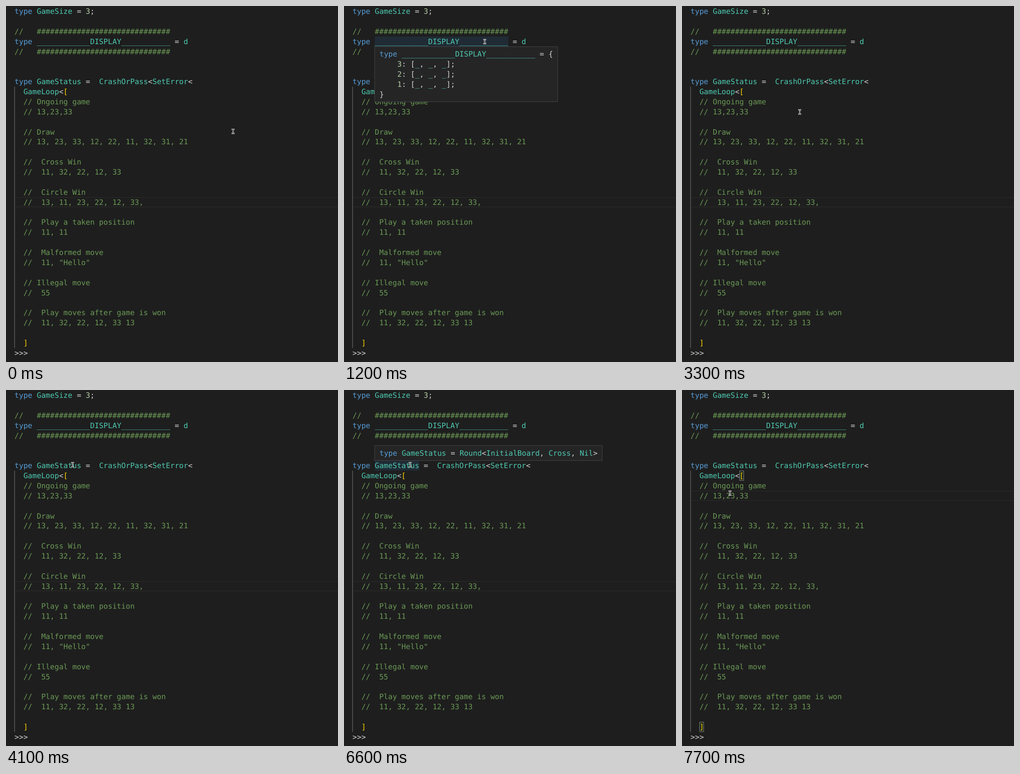
An HTML page that plays this animation: 723 by 775 pixels, repeating every 8 s.

```html
<!DOCTYPE html>
<html lang="en">
<head>
<meta charset="utf-8">
<title>Type-level game</title>
<style>
  html, body { margin: 0; width: 100%; height: 100%; overflow: hidden; background: #1e1e1e; }
  svg { display: block; width: 723px; height: 775px; }
  text {
    font: 16.1px "DejaVu Sans Mono", monospace;
    white-space: pre;
    text-rendering: geometricPrecision;
    fill: #d4d4d4;
  }
  .keyword { fill: #569cd6; }
  .name { fill: #4ec9b0; }
  .number { fill: #b5cea8; }
  .comment { fill: #6a9955; }
  .bracket { fill: #ffd700; }
  .tip .bracket { fill: #d4d4d4; }
  .panel { fill: #252526; stroke: #454545; }
  .hover { fill: #264f78; fill-opacity: .25; }
  .guide { stroke: #707070; stroke-width: 1.1; }
  .active { fill: none; stroke: #2b2b2b; stroke-width: 1.2; }
  .match { fill: #006400; fill-opacity: .1; stroke: #888; }
  .halo { fill: none; stroke: #f4f4f4; stroke-width: 2.5; }
  .core { fill: none; stroke: #111; stroke-width: .9; }
  .arrow { fill: #111; stroke: #f4f4f4; stroke-width: 1; stroke-linejoin: round; }
</style>
</head>
<body>
<svg viewBox="0 0 723 775">
  <path class="guide" d="M18.7 175.6V744.4"/>
  <path class="active" id="activeLine"/>
  <g id="matches"></g>
  <g id="hovers"></g>
  <g id="code"></g>
  <g id="tips"></g>
  <g id="pointer">
    <g id="beam">
      <path class="halo" d="M-3.2-4.6H-1.5L0-3.4L1.5-4.6H3.2M0-3.4V3.4M-3.2 4.6H-1.5L0 3.4L1.5 4.6H3.2"/>
      <path class="core" d="M-2.8-4.6H-1.5L0-3.4L1.5-4.6H2.8M0-3.4V3.4M-2.8 4.6H-1.5L0 3.4L1.5 4.6H2.8"/>
    </g>
    <path id="arrow" class="arrow" d="M0-4.5V4L2-.1 2 4L3.4 5.2 4.6 4.6 3.2 1.7H5.6Z" transform="translate(0 0)"/>
  </g>
</svg>
<script>
const LEFT = 18.5, TOP = 0.5, CHAR = 9.693, LINE = 21.88, BASE = 16.5;
const LOOP = 8000, TICK = 100;
const $ = id => document.getElementById(id);

const title = "_".repeat(12) + "DISPLAY" + "_".repeat(11);
const rule = "//   " + "#".repeat(30);

const source = `type GameSize = 3;

${rule}
type ${title} = d
${rule}


type GameStatus =  CrashOrPass<SetError<
  GameLoop<[
  // Ongoing game
  // 13,23,33

  // Draw
  // 13, 23, 33, 12, 22, 11, 32, 31, 21

  //  Cross Win
  //  11, 32, 22, 12, 33

  //  Circle Win
  //  13, 11, 23, 22, 12, 33,

  //  Play a taken position
  //  11, 11

  //  Malformed move
  //  11, "Hello"

  // Illegal move
  //  55

  //  Play moves after game is won
  //  11, 32, 22, 12, 33 13

  ]
>>>`;

const boardType = `type ${title} = {
    3: [_, _, _];
    2: [_, _, _];
    1: [_, _, _];
}`;
const statusType = "type GameStatus = Round<InitialBoard, Cross, Nil>";

function add(parent, tag, attrs) {
  const node = document.createElementNS("http://www.w3.org/2000/svg", tag);
  for (const key in attrs) node.setAttribute(key, attrs[key]);
  return parent.appendChild(node);
}

const syntax = /(?<comment>\/\/.*)|(?<keyword>\btype\b)|(?<number>\d+)|(?<name>\w+)|(?<bracket>[[\]])|[^\w[\]/]+/g;

function write(parent, text, x, y) {
  text.split("\n").forEach((line, row) => {
    const node = add(parent, "text", { x, y: y + row * LINE });
    for (const token of line.matchAll(syntax)) {
      const kind = Object.keys(token.groups).find(key => token.groups[key]);
      add(node, "tspan", kind ? { class: kind } : {}).textContent = token[0];
    }
  });
}

function cells(parent, kind, row, col, count, inset = 0) {
  return add(parent, "rect", {
    class: kind, x: LEFT + col * CHAR + inset, y: TOP + row * LINE + inset,
    width: count * CHAR - 2 * inset, height: LINE - 2 * inset
  });
}

function tooltip(text, y, width, height) {
  const group = add($("tips"), "g", { class: "tip" });
  add(group, "rect", { class: "panel", x: 66.8, y, width, height });
  write(group, text, 77.2, y + 21.5);
  return group;
}

write($("code"), source, LEFT, TOP + BASE);
cells($("matches"), "match", 8, 11, 1, 0.5);
cells($("matches"), "match", 33, 2, 1, 0.5);

const hints = [
  { tip: tooltip(boardType, 88.5, 398.5, 120), word: cells($("hovers"), "hover", 3, 5, 30), from: 1100, to: 3200 },
  { tip: tooltip(statusType, 121, 495.5, 32.5), word: cells($("hovers"), "hover", 7, 5, 10), from: 4300, to: 6800 }
];

const linear = p => p;
const smooth = p => p * p * (3 - 2 * p);
const easeOut = p => 1 - (1 - p) ** 1.8;

// Pointer stops: time, x, y and the easing used to get there
const stops = [
  [100, 494.5, 273], [900, 306.5, 77.5, smooth],
  [2600, 306.5, 77.5, linear], [2700, 292, 124, linear],
  [3300, 256.3, 230.7, easeOut], [3500, 248, 242, easeOut],
  [4100, 145, 162.7, smooth], [6500, 145, 162.7, linear],
  [6600, 144, 162.7, linear], [7100, 108, 224, smooth],
  [7200, 108, 224, linear], [7700, 104.5, 224.5, smooth]
];

function pointerAt(time) {
  const next = stops.findIndex(stop => stop[0] > time);
  if (next === 0) return stops[0].slice(1);
  if (next < 0) return stops.at(-1).slice(1);
  const [t0, x0, y0] = stops[next - 1], [t1, x1, y1, ease] = stops[next];
  const p = ease((time - t0) / (t1 - t0));
  return [x0 + (x1 - x0) * p, y0 + (y1 - y0) * p];
}

function draw(time) {
  for (const { tip, word, from, to } of hints) {
    const opacity = time < from || time >= to ? 0 : time < from + TICK ? 0.5 : 1;
    tip.style.opacity = word.style.opacity = opacity;
  }

  const clicked = time >= 7500;
  const top = TOP + (clicked ? 10 : 19) * LINE + 0.7;
  $("activeLine").setAttribute("d", `M19.3 ${top}H723M19.3 ${top + LINE - 1.4}H723`);
  $("matches").style.opacity = clicked ? 1 : 0;

  const [x, y] = pointerAt(time);
  const overTip = time >= 2700 && time < 3200 && y < 209;
  $("pointer").setAttribute("transform", `translate(${x} ${y})`);
  $("beam").style.opacity = overTip ? 0 : 1;
  $("arrow").style.opacity = overTip ? 1 : 0;
}

const start = performance.now();
function frame() {
  const elapsed = (performance.now() - start) % LOOP;
  draw(Math.floor(elapsed / TICK) * TICK);
  requestAnimationFrame(frame);
}
frame();
</script>
</body>
</html>
```
